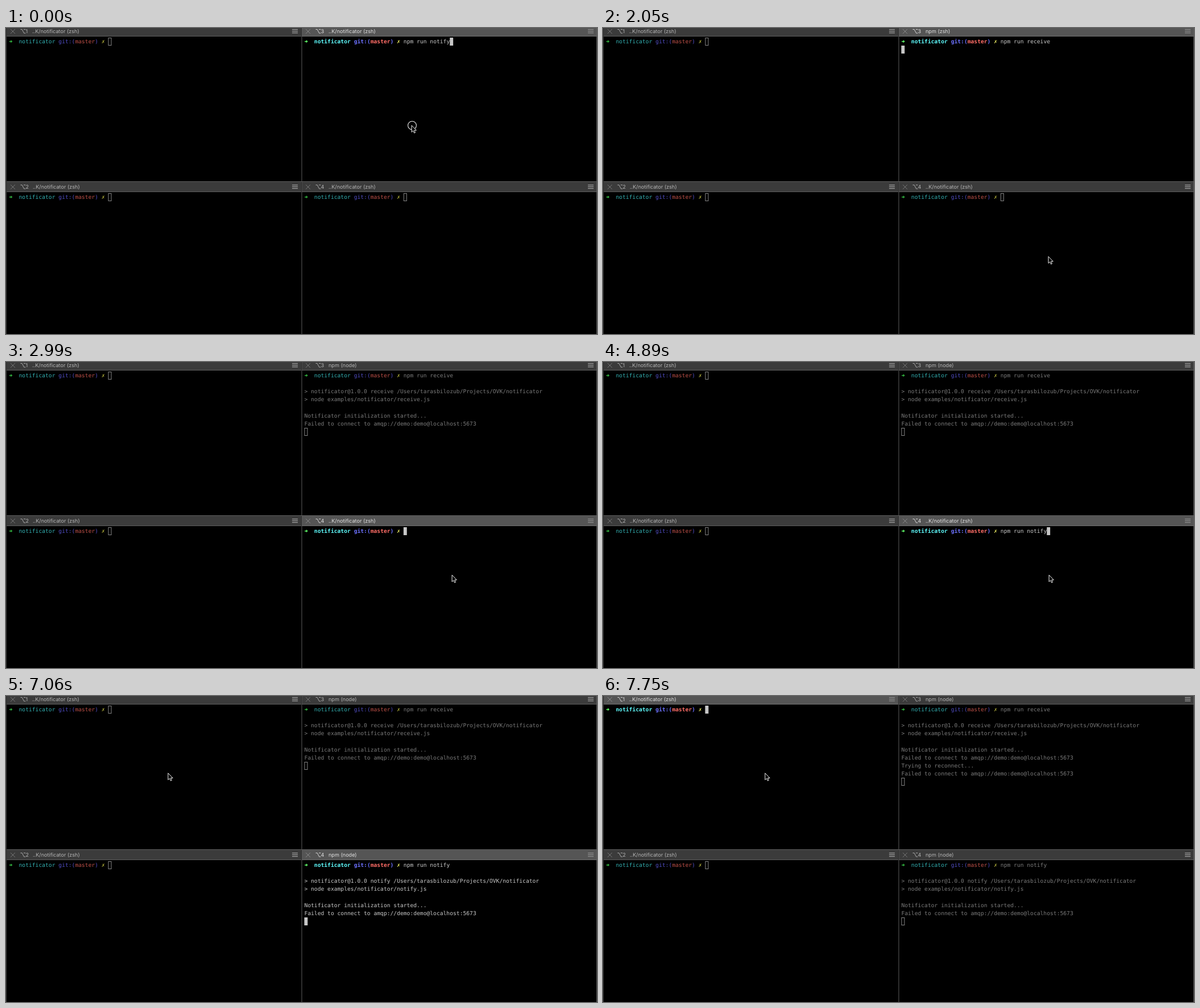
These frames come from a looping animation (1039x539 px, 8 s). An HTML page:

```html
<!DOCTYPE html>
<html lang="en">
<head>
<meta charset="utf-8">
<title>Terminal panes</title>
<style>
html, body { margin: 0; width: 100%; height: 100%; overflow: hidden; background: #000; }
svg { display: block; width: 1039px; height: 539px; }
text { text-rendering: geometricPrecision; white-space: pre; }
.mono { font: 9.66px "DejaVu Sans Mono", monospace; }
.bold { font-weight: bold; }
.title { font: 9.1px Inter, "Liberation Sans", sans-serif; }
</style>
</head>
<body>
<svg id="stage" viewBox="0 0 1039 539" xmlns="http://www.w3.org/2000/svg"></svg>
<script>
const LOOP = 8000, COL = 5.815, ROW = 14.1, EDGE = '#5d5d5d';
const stage = document.getElementById('stage');

const BRIGHT = { green: '#5ff967', cyan: '#5ffdff', blue: '#6c71ff', red: '#ff6d67', yellow: '#f8f867',
  text: '#c9c9c9', bar: '#555555', rule: '#707070', title: '#e2e2e2', icon: '#858585', menu: '#8e8e8e' };
const DIM = { green: '#30ac3d', cyan: '#33b0b2', blue: '#504dc2', red: '#be5048', yellow: '#b0ae3a',
  text: '#7a7a7a', bar: '#3b3b3b', rule: EDGE, title: '#b6b6b6', icon: '#727272', menu: '#a2a2a2' };

// Pointer tip: time, x, y
const PATH = [
  [0, 712.6, 171], [1790, 752, 290], [1900, 787, 402.5], [2050, 782.5, 402], [2165, 782.5, 389],
  [2280, 783, 377], [2430, 783.6, 374.7], [6420, 780, 383], [6540, 540.5, 291.3],
  [6680, 327, 180], [6830, 284.4, 135.3]
];
const CLICKS = [[0, 90], [2810, 2990], [6980, 7060]];

const last = (list, t) => list.filter(e => e[0] <= t).pop();
const rect = (x, y, w, h, fill) => `<rect x="${x}" y="${y}" width="${w}" height="${h}" fill="${fill}"/>`;
const line = (d, color, w) => `<path d="${d}" fill="none" stroke="${color}" stroke-width="${w}"/>`;
const label = (x, y, s, color, cls) =>
  `<text x="${x.toFixed(2)}" y="${y.toFixed(2)}" fill="${color}" class="${cls}">${s.replace(/>/g, '&gt;')}</text>`;

function output(task) {
  return {
    2: `> notificator@1.0.0 ${task} /Users/tarasbilozub/Projects/OVK/notificator`,
    3: `> node examples/notificator/${task}.js`,
    5: 'Notificator initialization started...',
    6: 'Failed to connect to amqp://demo:demo@localhost:5673',
    7: 'Trying to reconnect...',
    8: 'Failed to connect to amqp://demo:demo@localhost:5673'
  };
}

function header(x, y, w, n, title, c) {
  const m = y + 6, k = x + 24.5, top = m - 3.5;
  const titleX = x + (n === 1 ? 45 : n === 2 ? 46 : 47);
  return rect(x, y ? 271 : 0, w, y ? 17 : 14, c.bar) +
    rect(x, y + 14, w, 1, c.rule) +
    line(`M${x + 7} ${m - 4}l8 8m0 -8l-8 8`, c.icon, 1) +
    line(`M${k} ${top}h2.7l3.4 6.6h2.8M${k + 5.6} ${top}h3.3`, c.title, .9) +
    label(x + 33.5, m + 3.3, String(n), c.title, 'title') +
    label(titleX, m + 3.3, title, c.title, 'title') +
    [-4, -1, 2].map(d => rect(x + w - 16, m + d, 10, 1.2, c.menu)).join('');
}

function prompt(x, y, c, active) {
  const cls = active ? 'mono bold' : 'mono';
  const parts = [[3, 'notificator', 'cyan'], [15, 'git:(', 'blue'], [20, 'master', 'red'],
    [26, ')', 'blue'], [28, '✗', 'yellow']];
  return `<path d="M${x + .7} ${y - 4.1}h2.6v-1.9l3 2.6l-3 2.6v-1.9h-2.6z" fill="${c.green}"/>` +
    parts.map(([col, s, color]) => label(x + col * COL, y, s, c[color], cls)).join('');
}

function caret(x, y, col, row, active) {
  const cx = x + col * COL, cy = Math.round(y + 17 + row * ROW);
  return active
    ? rect(cx.toFixed(2), cy, 5.9, 14, '#c7c7c7')
    : `<rect x="${(cx + .5).toFixed(2)}" y="${cy + .5}" width="5" height="13" fill="none" stroke="#868686"/>`;
}

function pane(n, active, s = {}) {
  const right = n > 2, y = n % 2 ? 0 : 274;
  const x = right ? 520 : 1, w = right ? 519 : 518;
  const tx = right ? 524.4 : 5.1, base = y + 27.1;
  const c = active ? BRIGHT : DIM, cmd = s.cmd || '', row = s.row || 0;
  let out = header(x, y, w, n, s.title || '..K/notificator (zsh)', c) + prompt(tx, base, c, active);
  if (cmd) out += label(tx + 30 * COL, base, cmd, c.text, 'mono');
  const rows = output(s.task);
  for (const r in rows)
    if (r < row) out += label(tx, base + r * ROW, rows[r], c.text, 'mono');
  return out + caret(tx, y, row ? 0 : 30 + cmd.length, row, active);
}

function pointer(t) {
  const [, x, y] = last(PATH, t);
  const ring = CLICKS.some(([a, b]) => t >= a && t < b)
    ? `<circle cx="${x + 1.4}" cy="${y + .7}" r="7.4" fill="none" stroke="#e8e8e8" stroke-width="1.1"/>` : '';
  return ring + `<path transform="translate(${x} ${y})" d="M.5 .5V12.4L3.2 9.9L5 14L6.9 13.2L5.2 9.2H8.8Z"
    fill="#000" stroke="#f4f4f4" stroke-width="1" stroke-linejoin="round"/>`;
}

function scene(t) {
  const focus = last([[0, 3], [2990, 4], [7180, 1]], t)[1];
  const receiver = {
    task: 'receive',
    cmd: t < 810 ? 'npm run notify' : 'npm run receive',
    title: last([[0, ''], [1550, 'npm (zsh)'], [2430, 'npm (node)']], t)[1],
    row: last([[0, 0], [1550, 1], [2580, 6], [2690, 7], [7750, 9]], t)[1]
  };
  const sender = {
    task: 'notify',
    cmd: last([[0, ''], [3560, 'clear'], [3970, 'claer'], [4420, 'clear'], [4890, 'npm run notify']], t)[1],
    title: last([[0, ''], [6210, 'npm (zsh)'], [6830, 'npm (node)']], t)[1],
    row: last([[0, 0], [6090, 1], [6680, 6], [6980, 7]], t)[1]
  };
  return rect(0, 0, 1039, 539, '#000') +
    pane(1, focus === 1) + pane(2, false) +
    pane(3, focus === 3, receiver) + pane(4, focus === 4, sender) +
    rect(0, 270, 1039, 1, EDGE) + rect(519.5, 0, 1, 539, EDGE) + rect(1038, 0, 1, 539, EDGE) +
    rect(0, 0, 1.3, 539, '#303030') + pointer(t);
}

let shown = '';
function draw(now) {
  const next = scene(now % LOOP);
  if (next !== shown) stage.innerHTML = shown = next;
}

const start = performance.now();
function tick() {
  draw(performance.now() - start);
  requestAnimationFrame(tick);
}
tick();
</script>
</body>
</html>
```
